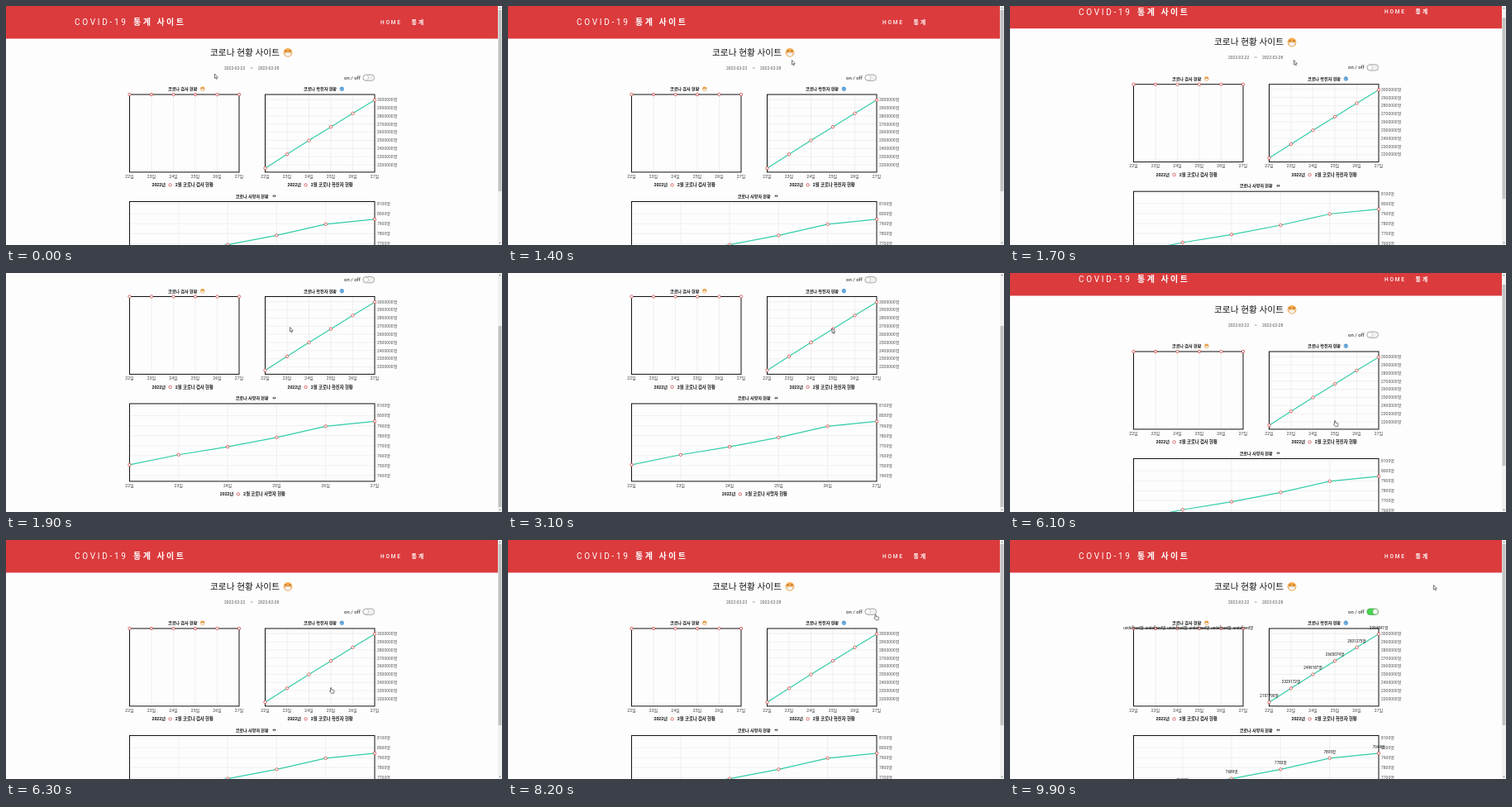
An HTML page for the animation above (10000 ms loop, 600x289 px).

```html
<!DOCTYPE html>
<html lang="ko">
<head>
<meta charset="utf-8">
<style>
  html, body { margin: 0; width: 100%; height: 100%; overflow: hidden; background: #fdfdfd; }
  svg { display: block; width: 100vw; height: 100vh; }
  text { font-family: Roboto, "Noto Sans CJK KR", "Noto Sans CJK", sans-serif; fill: #151515; white-space: pre; }
</style>
</head>
<body>
<svg viewBox="0 0 600 289">
  <defs>
    <g id="mask">
      <circle r="5.4" fill="#f7a94a"/>
      <path d="M-3.4-1.6q1-1.2 2 0M1.4-1.6q1-1.2 2 0" fill="none" stroke="#5a3417" stroke-width=".8"/>
      <path d="M-5.2 0L-3 .8M5.2 0L3 .8" stroke="#e8e8e8" stroke-width=".8"/>
      <path d="M-3.5.5Q0-.8 3.5.5V3Q0 6.2-3.5 3Z" fill="#f4f4f2" stroke="#c9b9a8" stroke-width=".4"/>
    </g>
    <g id="swirl">
      <circle r="2.7" fill="#7dbce8"/>
      <path d="M-2-.6A2 2 0 0 1 1.8-.4M2 .6A2 2 0 0 1-1.6 1M-.8.2A.8.8 0 1 1 .5.7" fill="none" stroke="#3b7fc0" stroke-width=".6"/>
    </g>
    <g id="skull">
      <path d="M-2.2-.2a2.2 2.1 0 0 1 4.4 0q0 1-.9 1.3v1h-2.6v-1q-.9-.3-.9-1.3" fill="#d5d5d5"/>
      <circle cx="-1" r=".8" fill="#222"/><circle cx="1" r=".8" fill="#222"/>
    </g>
  </defs>
  <g id="page"></g>
  <rect x="595" width="5" height="289" fill="#f1f1f1"/>
  <path d="M596.2 3.3l1.3-1.6 1.3 1.6zM596.2 285.7l1.3 1.6 1.3-1.6z" fill="#777"/>
  <rect id="thumb" x="595.6" width="3.8" height="219" fill="#c1c1c1"/>
  <g id="cursor" stroke="#444" stroke-width=".7" fill="#fff" stroke-linejoin="round">
    <path id="arrow" d="M0 0V5.5L1.2 4.5 2 6.4 2.9 6 2.1 4.2H3.8Z"/>
    <path id="hand" d="M1 .8Q1.7 0 2.2.8V3L5.2 3.7Q5.8 4 5.6 5L5 7.3H2L0 5Q0 4 1 4.6Z"/>
  </g>
</svg>
<script>
const LOOP = 10000, MAX_SCROLL = 78.5, TOGGLE_AT = 8300;
const SCROLL = [[1500, 0], [1600, 2], [1700, 12.3], [1800, 50], [1900, MAX_SCROLL],
  [5700, MAX_SCROLL], [5900, 50], [6100, 12], [6300, 0]];
const POINTER = [[0, 252.5, 82], [400, 290, 76], [1400, 343.5, 65.5], [2600, 343.5, 65.5],
  [3100, 392, 67], [3500, 392, 67], [4200, 327, 199], [4400, 386, 185], [4600, 437, 183.5],
  [5200, 391.5, 178], [6500, 391.5, 178], [7600, 443, 89.5], [8700, 443, 89.5], [9800, 512.5, 54.5]];
const HAND_SPANS = [[5200, 6600], [7600, 8700]];

const $ = id => document.getElementById(id);
const text = (x, y, size, str, attrs = '') =>
  `<text x="${x}" y="${y}" font-size="${size}" ${attrs}>${str}</text>`;
const line = (x1, y1, x2, y2) => `M${x1} ${y1}L${x2} ${y2}`;
const icon = (id, x, y, scale = 1) => `<use href="#${id}" transform="translate(${x} ${y}) scale(${scale})"/>`;
const dot = (x, y) => `<circle cx="${x}" cy="${y}" r="1.7" fill="#fff" stroke="#cf4848" stroke-width=".8"/>`;
const MIDDLE = 'text-anchor="middle"', BOLD = 'font-weight="700"';
const WHITE = 'style="fill:#fff"', GREY = 'style="fill:#555"';

function chart({ left, right, top, title, titleX, legendX, emoji, emojiX, values, ticks }) {
  const bottom = top + 93.9;
  const xs = values.map((_, i) => left + (right - left) * i / (values.length - 1));
  const ys = values.map(v => ticks ? ticks.y + (ticks.max - v) / ticks.step * ticks.gap : top);
  let grid = xs.slice(1, -1).map(x => line(x, top, x, bottom)).join('');
  let out = '', labels = '';
  for (let i = 0; ticks && i < ticks.count; i++) {
    const y = ticks.y + i * ticks.gap;
    grid += line(left, y, right, y);
    out += text(right + 3, y + 1.8, 5, ticks.max - i * ticks.step + '명', GREY);
  }
  out += `<path d="${grid}" stroke="#e6e6e6" stroke-width=".6"/>`;
  if (ticks) out += `<polyline points="${xs.map((x, i) => [x, ys[i]])}" fill="none" stroke="#32cda9" stroke-width="1.2"/>`;
  out += `<rect x="${left}" y="${top}" width="${right - left}" height="${bottom - top}" fill="none" stroke="#111"/>`;
  xs.forEach((x, i) => {
    out += dot(x, ys[i]) + text(x, bottom + 6.7, 5.1, 22 + i + '일', MIDDLE + ' style="fill:#444"');
    labels += text(x, Math.max(top + .5, ys[i] - 6.3), 4.6, values[i] + '명', MIDDLE);
  });
  out += text(titleX, top - 5, 5.1, title, BOLD) + icon(emoji, emojiX, top - 6.8, emoji === 'mask' ? .5 : 1);
  out += text(legendX, bottom + 17.4, 5.1, '2022년', BOLD) + dot(legendX + 22.1, bottom + 15.5)
    + text(legendX + 28.3, bottom + 17.4, 5.3, '2월 ' + title, BOLD);
  return out + `<g class="labels">${labels}</g>`;
}

$('page').innerHTML = `<rect width="595" height="39.5" fill="#db3b3d"/>`
  + text(83, 23.2, 10, 'COVID-19', 'letter-spacing="2.7" ' + WHITE)
  + text(154, 23.2, 10, '통계 사이트', `letter-spacing="2.5" ${BOLD} ${WHITE}`)
  + text(453, 21.8, 6.5, 'HOME', 'letter-spacing="1.8" font-weight="500" ' + WHITE)
  + text(490.5, 21.8, 7, '통계', `letter-spacing="1.7" ${BOLD} ${WHITE}`)
  + text(247, 59.7, 10.7, '코로나 현황 사이트') + icon('mask', 341, 56.3)
  + text(264, 76.5, 5, '2022-02-22', GREY)
  + text(295.6, 76.5, 5, '~', GREY)
  + text(305, 76.5, 5, '2022-02-28', GREY)
  + text(409, 88.8, 6, 'on / off')
  + `<rect id="track" x="431.8" y="83" width="13.8" height="7.4" rx="3.7" stroke-width=".8"/>
     <circle id="knob" cy="86.7" r="3.1" fill="#fff" stroke="#aaa" stroke-width=".6"/>`
  + chart({ left: 149.5, right: 282, top: 107, title: '코로나 검사 현황', titleX: 196, legendX: 176.5,
      emoji: 'mask', emojiX: 237.8, values: Array(6).fill('undefined') })
  + chart({ left: 313.5, right: 446, top: 107, title: '코로나 확진자 현황', titleX: 360, legendX: 340.5,
      emoji: 'swirl', emojiX: 406.3, values: [2157790, 2329172, 2499187, 2665074, 2831275, 2994841],
      ticks: { y: 113.2, max: 3000000, step: 100000, gap: 9.85, count: 9 } })
  + chart({ left: 149.5, right: 446, top: 236.5, title: '코로나 사망자 현황', titleX: 277.7, legendX: 258.8,
      emoji: 'skull', emojiX: 324.5, values: [7508, 7609, 7689, 7783, 7895, 7944],
      ticks: { y: 239.1, max: 8100, step: 100, gap: 12.05, count: 8 } });

function sample(keys, t, column = 1) {
  const next = keys.findIndex(k => k[0] > t);
  if (next === 0) return keys[0][column];
  if (next < 0) return keys[keys.length - 1][column];
  const a = keys[next - 1], b = keys[next];
  return a[column] + (b[column] - a[column]) * (t - a[0]) / (b[0] - a[0]);
}

const start = performance.now();
function draw() {
  // The picture advances ten times per second.
  const t = Math.floor((performance.now() - start) % LOOP / 100) * 100;
  const scroll = sample(SCROLL, t);
  $('page').setAttribute('transform', `translate(0 ${-scroll})`);
  $('thumb').setAttribute('y', 5 + scroll / MAX_SCROLL * 59);

  const on = t >= TOGGLE_AT;
  document.querySelectorAll('.labels').forEach(g => g.setAttribute('visibility', on ? 'visible' : 'hidden'));
  $('track').setAttribute('fill', on ? '#42d64b' : '#f0f0f0');
  $('track').setAttribute('stroke', on ? '#5aa85e' : '#999');
  $('knob').setAttribute('cx', on ? 442 : 435.4);

  const hand = HAND_SPANS.some(([from, to]) => t >= from && t < to);
  $('hand').setAttribute('visibility', hand ? 'visible' : 'hidden');
  $('arrow').setAttribute('visibility', hand ? 'hidden' : 'visible');
  $('cursor').setAttribute('transform', `translate(${sample(POINTER, t)} ${sample(POINTER, t, 2)})`);
  requestAnimationFrame(draw);
}
draw();
</script>
</body>
</html>
```
